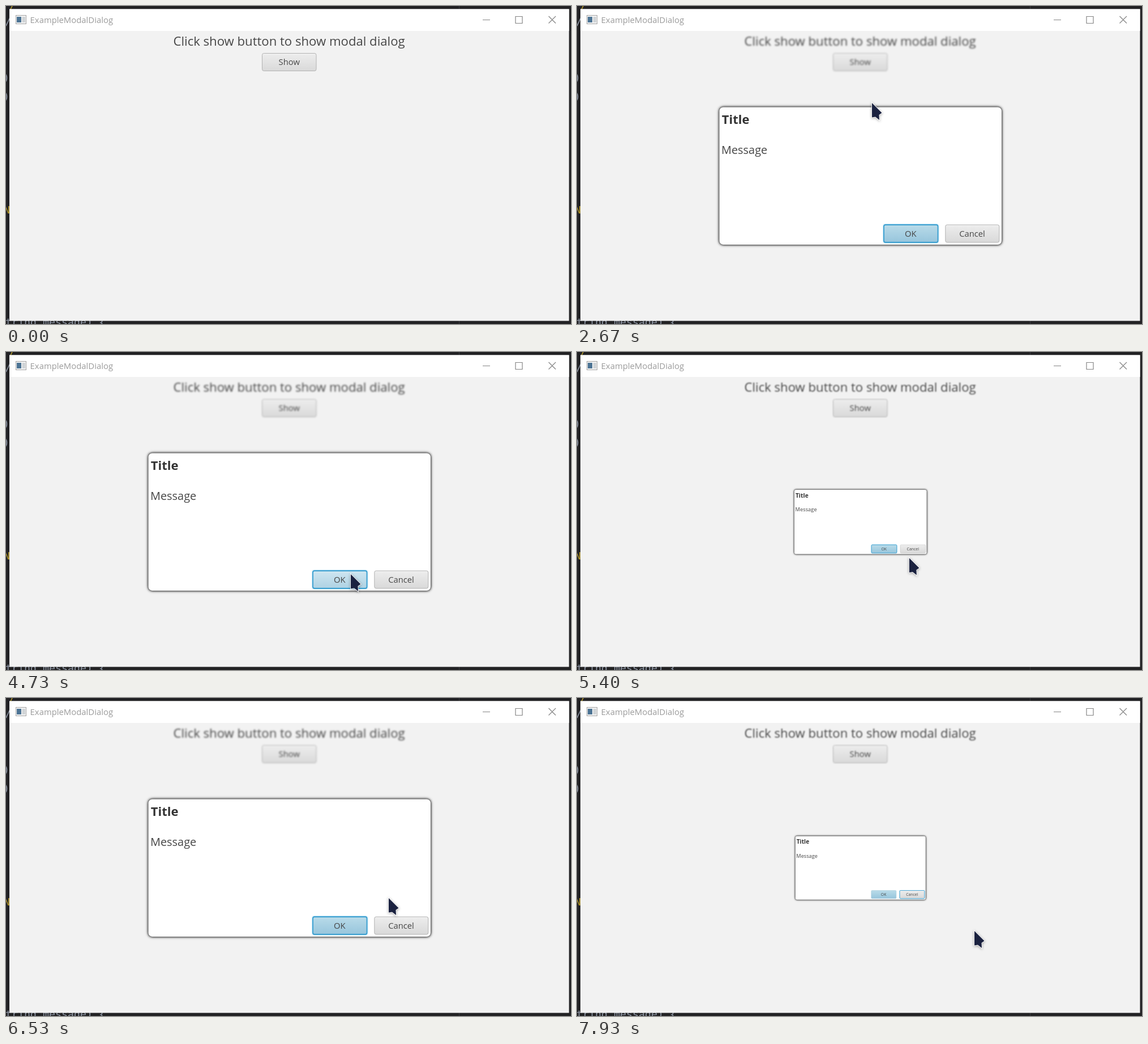
Animation, 998 px wide and 561 px high, one loop 8 s. Source, as an HTML page:

```html
<!DOCTYPE html>
<html lang="en">
<head>
<meta charset="utf-8">
<title>Modal dialog</title>
<style>
  html, body { margin: 0; width: 100%; height: 100%; overflow: hidden; background: #222224; }
  svg { display: block; width: 100vw; height: 100vh; }
  text { font-family: "Open Sans", "Noto Sans", sans-serif; fill: #474747; white-space: pre; }
  .code text { font: 18.3px "DejaVu Sans Mono", monospace; fill: #8f97a5; }
  .code .gold { fill: #b59a2c; }
  .bar text { font-size: 14.85px; fill: #9b9b9b; }
  .bar path { fill: none; stroke: #858585; stroke-width: 1.2; }
  .bar.active text { fill: #2a2a2a; }
  .bar.active path { stroke: #333; }
  .btn rect { fill: url(#plain); stroke: #b2b2b2; stroke-width: 1; }
  .btn text { font-size: 14.8px; text-anchor: middle; }
  .btn.hover rect { fill: url(#plainHover); }
  .btn.main rect { fill: url(#blue); stroke: #9cc3d4; }
  .btn.main.hover rect { fill: url(#blueHover); }
  .btn.focus rect { stroke: #3a9fd0; stroke-width: 1.8; filter: drop-shadow(0 0 .8px #6fc0e6); }
  #cursor { filter: drop-shadow(0 1px 2px rgba(0,0,0,.35)); }
</style>
</head>
<body>
<svg viewBox="0 0 998 561" preserveAspectRatio="none">
  <defs>
    <linearGradient id="plain" x2="0" y2="1">
      <stop stop-color="#f3f3f3"/><stop offset=".1" stop-color="#ebebeb"/><stop offset="1" stop-color="#d9d9d9"/>
    </linearGradient>
    <linearGradient id="plainHover" x2="0" y2="1">
      <stop stop-color="#fbfbfb"/><stop offset=".1" stop-color="#f7f7f7"/><stop offset="1" stop-color="#e3e3e3"/>
    </linearGradient>
    <linearGradient id="blue" x2="0" y2="1">
      <stop stop-color="#b9dbe9"/><stop offset="1" stop-color="#97c5dc"/>
    </linearGradient>
    <linearGradient id="blueHover" x2="0" y2="1">
      <stop stop-color="#cfe6f1"/><stop offset="1" stop-color="#aed2e3"/>
    </linearGradient>
  </defs>

  <rect width="998" height="561" fill="#222224"/>
  <g class="code">
    <path d="M800.5 0V561" stroke="#38383b"/>
    <text class="gold" x="6" y="5">/</text>
    <text x="-2" y="34">/</text>
    <text x="-5" y="133">)</text>
    <text x="-5" y="166">)</text>
    <text class="gold" x="-4" y="366">N</text>
    <text x="-1" y="564">tring message) {</text>
  </g>

  <rect x="6" y="5.5" width="988.5" height="550" fill="#f2f2f2"/>
  <g class="bar" id="bar">
    <rect x="6" y="5.5" width="988.5" height="38.5" fill="#fff"/>
    <rect x="17.5" y="16.5" width="18" height="15" fill="#f4f4f4" stroke="#a3a3a3"/>
    <rect x="19" y="19" width="8" height="10" fill="#4c7394"/>
    <rect x="28.5" y="19" width="5.5" height="10" fill="#cfd3d6"/>
    <text x="42.6" y="30.3">ExampleModalDialog</text>
    <path d="M842 24.5H855M900 18.5H912V30.5H900ZM958.5 18L971 30.5M971 18L958.5 30.5"/>
  </g>

  <g id="page">
    <text x="295.5" y="70" font-size="22.13">Click show button to show modal dialog</text>
    <g class="btn" id="show">
      <rect x="452.5" y="83.5" width="95.5" height="31" rx="3"/>
      <text x="500.3" y="104.3">Show</text>
    </g>
  </g>

  <g id="dialog">
    <rect id="box" x="251.5" y="178.5" width="498.5" height="242.5" rx="7" fill="#fff"/>
    <text x="255.7" y="208" font-size="22" font-weight="700" style="fill:#333">Title</text>
    <text x="255" y="260.7" font-size="19.9">Message</text>
    <g class="btn main" id="ok">
      <rect x="542" y="386" width="95.5" height="31" rx="3"/>
      <text x="589.3" y="406.8">OK</text>
    </g>
    <g class="btn" id="cancel">
      <rect x="650.8" y="386" width="95" height="31" rx="3"/>
      <text x="698" y="406.8">Cancel</text>
    </g>
  </g>

  <path id="cursor" d="M0 0L17.5 17.5L12.5 21L13 30L6 24.5L0 25.5Z" fill="#1b2240"
    stroke="#fff" stroke-opacity=".85" stroke-width="2" paint-order="stroke"/>
</svg>

<script>
const LOOP = 8000, STEP = 1000 / 15, FADE = 400;
const ENTER = 199, CLICK = 1930, CANCEL = 7721;
const SHOWN = [[2000, 5190], [6120, CANCEL]];  // opens, closes
const $ = id => document.getElementById(id);
const [bar, page, show, dialog, box, ok, cancel, cursor] =
  ["bar", "page", "show", "dialog", "box", "ok", "cancel", "cursor"].map($);

// pointer moves: start, end, x, y, then sway: x, y, half waves in y
const HOME = [88, 546];
const MOVES = [
  [200, 1000, 562, 276, 0, -230, 1],
  [1000, 1400, 505, 114],
  [2270, 2667, 521, 171],
  [2667, 3400, 149, 174, 230, 200, 1],
  [3533, 4400, 769, 253, 0, 160, 2],
  [4400, 4733, 609, 392],
  [4733, 5000, 600, 404],
  [5200, 6067, 503, 104],
  [6133, 6533, 676, 353],
  [6533, 6800, 290, 198],
  [6950, 7400, 702, 411]
];

const clamp = u => Math.min(1, Math.max(0, u));
const smooth = u => u * u * (3 - 2 * u);

function pointer(t) {
  let [x, y] = HOME;
  for (const [a, b, toX, toY, dx = 0, dy = 0, waves = 0] of MOVES) {
    if (t < a) break;
    const u = smooth(clamp((t - a) / (b - a)));
    x += (toX - x) * u + dx * Math.sin(2 * Math.PI * u);
    y += (toY - y) * u + dy * Math.sin(waves * Math.PI * u);
  }
  return [x, y];
}

// linear in the middle, rounded over the first and last fifth
function ease(u) {
  u = clamp(u);
  if (u < .2) return 3.125 * u * u;
  if (u > .8) return 1 - 3.125 * (1 - u) ** 2;
  return 1.25 * u - .125;
}

const openness = t => Math.max(...SHOWN.map(([a, b]) =>
  ease((t - a) / FADE) - ease((t - b) / FADE)));

function over(btn, [x, y]) {
  const r = btn.querySelector("rect"), v = n => +r.getAttribute(n);
  return x >= v("x") && x <= v("x") + v("width") &&
    y >= v("y") && y <= v("y") + v("height");
}

function draw(t) {
  const s = openness(t), pos = pointer(t), [first, second] = SHOWN;
  const active = (t >= CLICK && t < first[0]) ||
    (t >= first[1] + FADE && t < second[0]);

  cursor.style.display = t < ENTER ? "none" : "";
  cursor.setAttribute("transform", `translate(${pos})`);

  dialog.style.display = s > 0 ? "" : "none";
  dialog.setAttribute("transform",
    `translate(500.8 299.7) scale(${s}) translate(-500.8 -299.7)`);
  // the shadow keeps much of its width while the dialog is small
  const glow = 2 / Math.sqrt(s || 1);
  box.style.filter = `drop-shadow(0 0 ${glow}px #000) drop-shadow(0 0 ${glow}px rgba(0,0,0,.45))`;
  page.style.filter = s > 0 ? `blur(${1.5 * Math.sqrt(s)}px)` : "none";

  bar.classList.toggle("active", active);
  show.classList.toggle("focus", active);
  show.classList.toggle("hover", s === 0 && t > ENTER && over(show, pos));
  ok.classList.toggle("hover", s === 1 && over(ok, pos));
  cancel.classList.toggle("hover", s === 1 && over(cancel, pos));
  ok.classList.toggle("focus", t < CANCEL);
  cancel.classList.toggle("focus", t >= CANCEL);
}

const start = performance.now();
function tick() {
  const t = Math.max(0, performance.now() - start) % LOOP;
  draw(Math.floor((t + 4) / STEP) * STEP % LOOP);
  requestAnimationFrame(tick);
}
tick();
</script>
</body>
</html>
```
